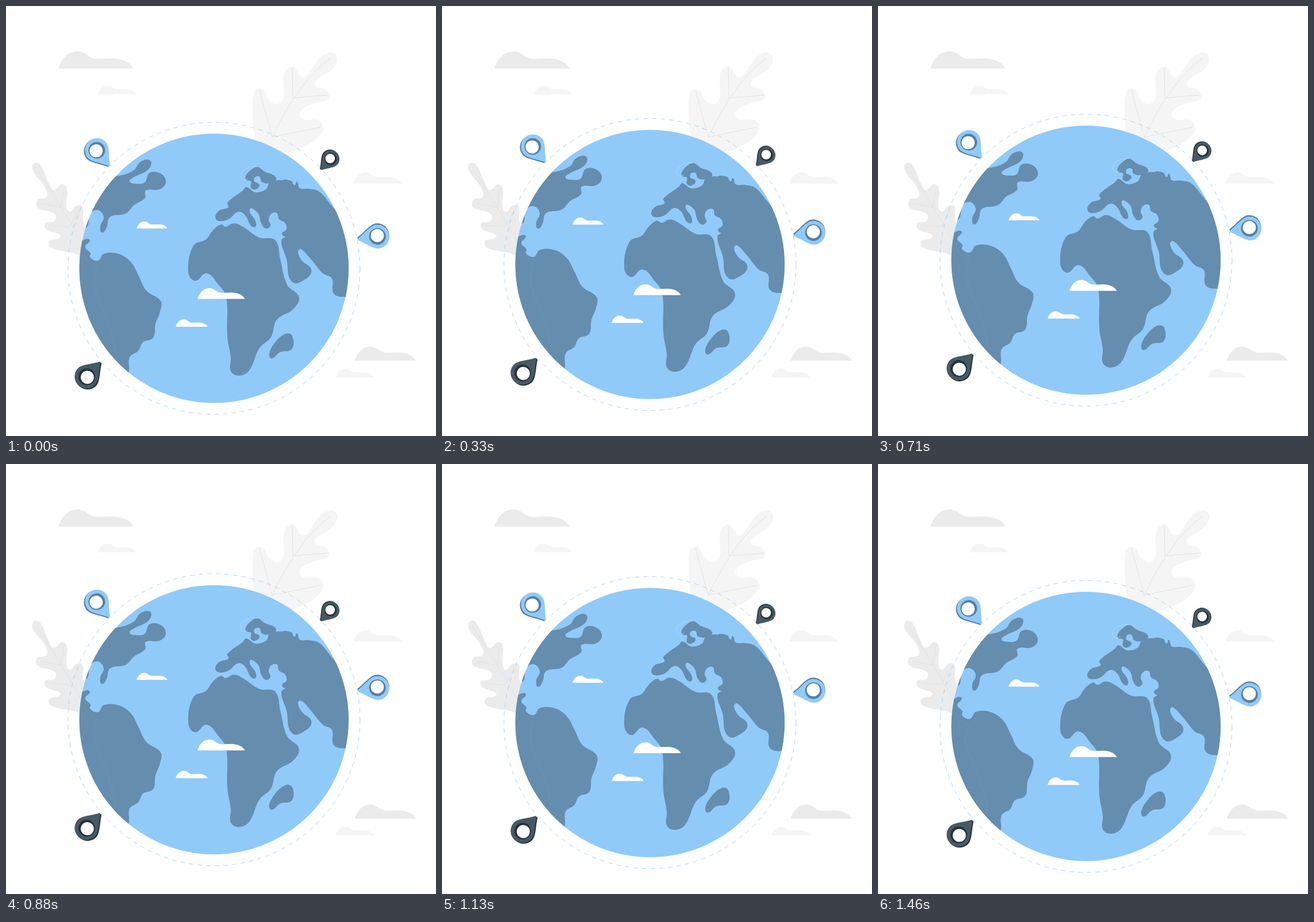
Animation, 748 px wide and 748 px high, one loop 1.5 s. Source, as an HTML page:

```html
<!DOCTYPE html>
<html lang="en">
<head>
<meta charset="utf-8">
<title>Floating globe</title>
<style>
html, body { margin: 0; width: 100%; height: 100%; overflow: hidden; background: #fff; }
svg { display: block; width: 100vw; height: 100vh; }
</style>
</head>
<body>
<svg viewBox="0 0 748 748">
  <defs>
    <clipPath id="disc"><circle cx="361.8" cy="456.3" r="234.2"/></clipPath>
    <path id="cloud" d="M0 0C5-16 16-30 33-30C49-30 52-17 68-17C82-17 95-19 108-16C119-13 127-8 131 0Z"/>
    <path id="drop" d="M-20.8 0A20.8 20.8 0 1 1 20.8 0C20.8 10 8 22 1.5 34Q0 36-1.5 34C-8 22-20.8 10-20.8 0Z"/>
  </defs>
  <g id="back"></g>
  <g fill="none" stroke="#e0e0e0" stroke-width=".9" stroke-linecap="round">
    <path d="M463 228Q510 130 564 91M441 147L463 228M498 108L499 160L560 155M463 228L547 211"/>
    <path d="M52 281Q110 370 132 412M101 317L95 350L60 343M128 352L110 384L78 382"/>
  </g>
  <g id="globe">
    <circle cx="361.8" cy="456.3" r="254" fill="none" stroke="#90caf9" stroke-width=".8" stroke-dasharray="7.5"/>
    <circle cx="361.8" cy="456.3" r="234.2" fill="#90caf9"/>
    <g id="land" clip-path="url(#disc)" fill="#658dae"></g>
    <path d="M437 279C420 278 406 288 408 297C410 304 418 304 421 300" fill="none" stroke="#b5dbfa" stroke-width=".8"/>
    <path d="M134 432Q147 452 158 455L153 477C150 500 185 550 190 605" fill="none" stroke="#7199b9" stroke-width=".6"/>
    <g id="front"></g>
  </g>
</svg>
<script>
const byId = id => document.getElementById(id);

function add(parent, tag, attrs) {
  const el = document.createElementNS('http://www.w3.org/2000/svg', tag);
  for (const k in attrs) el.setAttribute(k, attrs[k]);
  byId(parent).appendChild(el);
}

// Closed curve through key points; handles scale with each span, so bends stay round
function smooth(text) {
  const p = text.trim().split(/\s+/).map(s => s.split(',').map(Number));
  const n = p.length, at = i => p[(i + n) % n];
  const dist = (a, b) => Math.hypot(b[0] - a[0], b[1] - a[1]);
  const handle = (i, span) => {
    const a = at(i - 1), c = at(i + 1), k = 0.36 * span / dist(a, c);
    return at(i).map((v, j) => (v + (c[j] - a[j]) * k).toFixed(1));
  };
  let d = 'M' + p[0];
  for (let i = 0; i < n; i++) {
    const span = dist(at(i), at(i + 1));
    d += `C${handle(i, span)} ${handle(i + 1, -span)} ${at(i + 1)}`;
  }
  return d + 'Z';
}

const leaf = (fill, points) => add('back', 'path', { d: smooth(points), fill });
const land = points => add('land', 'path', { d: smooth(points) });

const cloud = (parent, x, y, w, fill) =>
  add(parent, 'use', { href: '#cloud', fill, transform: `translate(${x} ${y}) scale(${w / 131})` });

function pin(id, x, y, turn, size, face, side) {
  add('front', 'g', { id, transform: `translate(${x} ${y}) rotate(${turn}) scale(${size})` });
  add(id, 'use', { href: '#drop', x: -1.2, fill: side });
  add(id, 'use', { href: '#drop', x: 1.2, fill: face });
  add(id, 'circle', { cx: 0.8, r: 14.5, fill: side });
  add(id, 'circle', { cx: -0.6, r: 11.4, fill: '#fff' });
}

// Scenery
cloud('back', 91, 109, 131, '#ebebeb');
cloud('back', 160, 153.5, 66, '#f5f5f5');
cloud('back', 604, 309, 85, '#f5f5f5');
cloud('back', 606.5, 617, 106.5, '#ebebeb');
cloud('back', 573, 646, 67, '#f5f5f5');
leaf('#f5f5f5', `441,248 430,200 431,152 440,144 449,148 457,163 472,171 483,160 484,118
  498,105 509,117 517,124 530,113 546,90 567,80.5 576.5,92 566,111 541,128 538,139
  556,146 561,161 533,170 511,184 517,197 544,199 551,217 520,244 470,258`);
leaf('#ebebeb', `50,273 46,285 67,314 71,332 55,337 54,350 85,362 84,374 68,378 71,389
  94,398 92,404 75,409 78,420 110,428 150,430 134,372 133,349 122,348 111,358
  105,347 106,318 98,310 83,320 75,309 60,277`);

// North America
land(`193,296 222,286 234,271 251,269 248,284 222,298 215,305 225,309 241,307 250,290
  270,292 278,307 267,319 243,321 242,334 223,346 208,361 181,367 175,385 167,394
  164,383 170,367 160,355 147,361 138,386 110,370 120,300`);
// Central and South America
land(`125,416 140,405 146,408 138,419 147,430 146,437 160,443 170,431 195,431 217,445
  231,470 244,495 269,513 268,532 260,553 256,577 238,585 230,600 215,611 212,640
  180,670 100,600`);
// Africa and Madagascar
land(`382,384 374,380 360,390 348,406 326,417 317,462 329,478 349,465 369,484 383,506
  385,575 391,612 391,635 405,643 423,634 441,595 461,576 471,546 500,527 509.5,506
  489,485 477,440 468,407 441,403 412,384 396,378`);
land('487,570 498,574 497,597 477,602 462,613 458,604 470,583');
// Europe
land(`364,367 371,356 387,350 385,342 412,321 418,315 434,324 452,319 460,306 486,305
  520,330 520,395 492,402 480,397 488,388 485,377 475,371 471,360 461,362 457,372
  460,382 452,387 444,378 438,360 424,354 434,374 434,384 426,382 416,364 404,358
  387,371 370,374`);
// Asia and Arabia
land(`480,305 496,304 502,312 506,306 511,317 528,318 545,323 563,343 580,366 590,395
  610,420 605,500 590,506 570,500 567,474 551,465 530,440 513,423 508,428 515,443
  531,458 524,473 498,480 488,440 479,408 490,398 492,360`);
// Scandinavia
land(`417,296 425,286 437,280 450,288 470,299 458,308 445,306 441,297 433,298 432,305
  441,311 434,319 426,316 426,305 418,303`);

cloud('front', 227, 387, 54, '#fff');
cloud('front', 333, 509.6, 82.5, '#fff');
cloud('front', 295, 558, 56, '#fff');

const BLUE = ['#90caf9', '#587f9f'], DARK = ['#455a64', '#263238'];
pin('west', 157.3, 251.5, -39, 1, ...BLUE);
pin('east', 646, 400, 82, 1, ...BLUE);
pin('south', 141, 645.5, -137, 1, ...DARK);
pin('north', 564.2, 265.5, 42, 0.73, ...DARK);

const LOOP = 1500, STEPS = 36, LOW = 35.4, RISE = 14.96;

// Height above the lowest point: a linear rise and fall
function height(step) {
  const gap = Math.abs(step - LOW);
  return Math.min(gap, STEPS - gap) * 2 / STEPS * RISE;
}

// Motion is stepped at 24 pictures per second
function draw(time) {
  const step = Math.min(STEPS - 1, Math.floor((time % LOOP) / LOOP * STEPS + 0.2));
  byId('globe').setAttribute('transform', `translate(0 ${(height(0) - height(step)).toFixed(3)})`);
}

let start;
function tick() {
  const now = performance.now();
  start ??= now;
  draw(now - start);
  requestAnimationFrame(tick);
}
draw(0);
requestAnimationFrame(tick);
</script>
</body>
</html>
```
